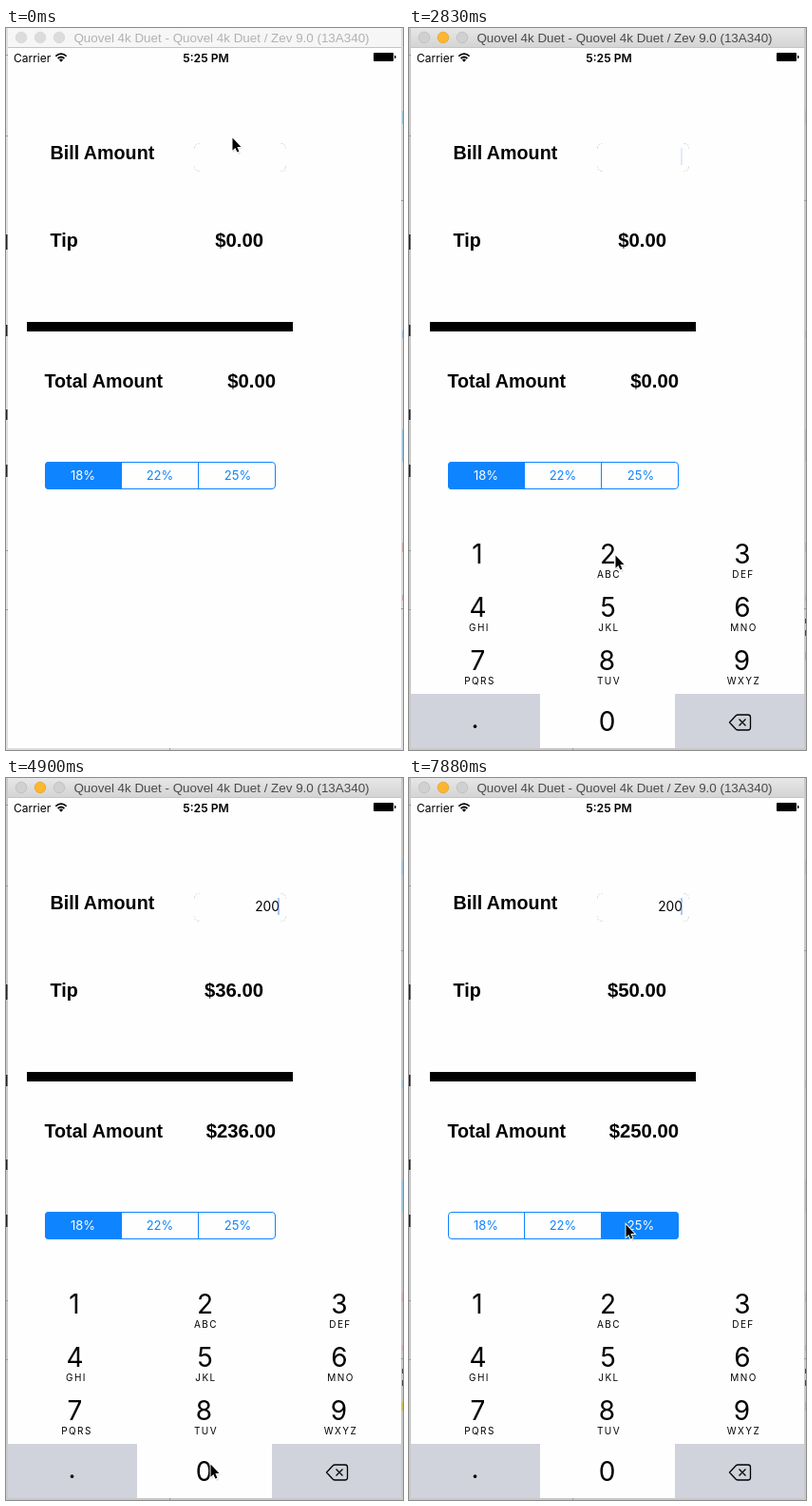
An HTML page for the animation above (8000 ms loop, 418 by 759 pixels).

```html
<!DOCTYPE html>
<html lang="en">
<head>
<meta charset="utf-8">
<title>Tip calculator</title>
<style>
  html, body { margin: 0; height: 100%; overflow: hidden; background: #fff; }
  svg { display: block; width: 418px; height: 759px; }

  text { font-family: Inter, Roboto, sans-serif; }
  .mid { text-anchor: middle; }
  .title { font: 13.4px "Liberation Sans", sans-serif; }
  .label { font: bold 19.7px "Liberation Sans", sans-serif; }
  .sum { font: bold 20.3px "Liberation Sans", sans-serif; text-anchor: end; }
  .entry { font-size: 13.8px; text-anchor: end; }
  .num { font-size: 28px; text-anchor: middle; }
  .abc { font-size: 10px; letter-spacing: 1.4px; text-anchor: middle; }
  .seg { font-size: 13px; text-anchor: middle; fill: #0f84ff; }

  /* Every change is a hard step on one shared 8 s clock. */
  .a { animation: 8s step-end -8ms infinite; }
  .off { opacity: 0; }

  .active { animation-name: active; }
  @keyframes active { 1.875% { opacity: 1 } }
  .late { animation-name: late; }
  @keyframes late { 7.375% { opacity: 1 } }

  .v0 { animation-name: v0; }
  @keyframes v0 { 40.875% { opacity: 0 } }
  .v1 { animation-name: v1; }
  @keyframes v1 { 40.875% { opacity: 1 } 50% { opacity: 0 } }
  .v2 { animation-name: v2; }
  @keyframes v2 { 50% { opacity: 1 } 55.625% { opacity: 0 } }
  .v3 { animation-name: v3; }
  @keyframes v3 { 55.625% { opacity: 1 } 78% { opacity: 0 } }
  .v4 { animation-name: v4; }
  @keyframes v4 { 78% { opacity: 1 } 94.75% { opacity: 0 } }
  .v5 { animation-name: v5; }
  @keyframes v5 { 94.75% { opacity: 1 } }
  .digits { animation-name: digits; }
  @keyframes digits { 55.625% { opacity: 1 } }

  .caret { animation-name: caret; }
  @keyframes caret {
    11.125%, 24.125%, 37.125% { opacity: 1 }
    18.625% { opacity: .3 }
    20.375%, 31.625% { opacity: 0 }
    29.75% { opacity: .3 }
    35.375% { opacity: .15 }
    61.25%, 74.25%, 85.375%, 98.5% { opacity: .4 }
    63.125%, 76.125%, 87.25% { opacity: 0 }
    66.875%, 79.875%, 91% { opacity: 1 }
  }

  .pad { transform: translateY(230px); animation-name: pad; }
  @keyframes pad {
    11.125% { transform: translateY(170px) }
    13% { transform: translateY(62px) }
    14.875% { transform: translateY(8px) }
    16.75% { transform: none }
  }
  .rules { animation-name: rules; }
  @keyframes rules { 16.75% { opacity: 0 } }
  .key2 { animation-name: key2; }
  @keyframes key2 { 37.125% { opacity: 1 } 40.875% { opacity: 0 } }
  .key0 { animation-name: key0; }
  @keyframes key0 {
    48.25%, 53.75% { opacity: 1 }
    50%, 55.625% { opacity: 0 }
  }

  .s1 { animation-name: s1; }
  @keyframes s1 { 78% { opacity: .77 } 79.875% { opacity: 0 } }
  .s2 { animation-name: s2; }
  @keyframes s2 {
    76.125% { opacity: .15 } 78% { opacity: .33 } 79.875% { opacity: 1 }
    94.75% { opacity: .77 } 96.625% { opacity: 0 }
  }
  .s3 { animation-name: s3; }
  @keyframes s3 { 94.75% { opacity: .33 } 96.625% { opacity: 1 } }
  .t1 { fill: #fff; animation-name: t1; }
  @keyframes t1 { 78% { fill: #cfe4fd } 79.875% { fill: #0f84ff } }
  .t2 { animation-name: t2; }
  @keyframes t2 {
    78% { fill: #5eabfa } 79.875% { fill: #fff }
    94.75% { fill: #cfe4fd } 96.625% { fill: #0f84ff }
  }
  .t3 { animation-name: t3; }
  @keyframes t3 { 94.75% { fill: #5eabfa } 96.625% { fill: #fff } }

  .pointer { transform: translate(238px, 115px); animation-name: pointer; }
  @keyframes pointer {
    1.875% { transform: translate(235px, 127px) }
    3.75% { transform: translate(234px, 130px) }
    18.625% { transform: translate(232px, 150px) }
    20.375% { transform: translate(226px, 220px) }
    22.25% { transform: translate(219px, 310px) }
    24.125% { transform: translate(215px, 400px) }
    26% { transform: translate(213px, 470px) }
    27.875% { transform: translate(214px, 520px) }
    29.75% { transform: translate(216px, 546px) }
    31.625% { transform: translate(217px, 554px) }
    42.75% { transform: translate(217px, 590px) }
    44.5% { transform: translate(216px, 665px) }
    46.375% { transform: translate(215px, 715px) }
    48.25% { transform: translate(215px, 721px) }
    63.125% { transform: translate(205px, 695px) }
    65% { transform: translate(180px, 625px) }
    66.875% { transform: translate(152px, 545px) }
    68.625% { transform: translate(128px, 490px) }
    70.5% { transform: translate(121px, 476px) }
    72.375% { transform: translate(132px, 475px) }
    74.25% { transform: translate(143px, 476px) }
    85.375% { transform: translate(152px, 477px) }
    87.25% { transform: translate(176px, 477px) }
    89.125% { transform: translate(204px, 474px) }
    91% { transform: translate(222px, 471px) }
    92.875% { transform: translate(228px, 469px) }
  }
</style>
</head>
<body>
<svg viewBox="0 0 418 759">
  <defs>
    <linearGradient id="bar" x2="0" y2="1">
      <stop stop-color="#e7e7e7"/><stop offset="1" stop-color="#d3d3d3"/>
    </linearGradient>
    <clipPath id="screen"><path d="M2 21H416V757H2z"/></clipPath>
    <clipPath id="pill"><rect x="41" y="456" width="243" height="29" rx="4"/></clipPath>
  </defs>

  <!-- desktop slivers around the window -->
  <path fill="#dedede" d="M0 0H418V759H0z"/>
  <path class="a active off" fill="#c9c9c9" d="M0 0H418V759H0z"/>
  <path fill="#222" d="M0 217h1.5v16H0zM0 312h1.5v12H0zM0 401h1.5v11H0zM0 459h1.5v13H0z"/>
  <path fill="#999" d="M0 28h2v1H0zM0 113h2v1H0zM0 549h2v1H0zM0 611h2v1H0zM172 757h1v2h-1zM416 181h2v1h-2zM416 610h2v1h-2z"/>
  <path fill="#9cc3de" d="M417 87h1v14h-1zM417 318h1v8h-1zM417 422h1v34h-1z"/>
  <path fill="#d3a9a9" d="M417 541h1v10h-1zM417 596h1v6h-1z"/>
  <g class="a late off">
    <path fill="#444" d="M417 621h1v5h-1zM417 633h1v6h-1z"/>
    <path fill="#c9b94a" d="M417 656h1v9h-1z"/>
  </g>

  <!-- title bar -->
  <path fill="#f6f6f6" d="M2 0H416V21H2z"/>
  <g fill="#dcdcdc" stroke="#d0d0d0" stroke-width=".6">
    <circle cx="16" cy="10" r="5.8"/><circle cx="36" cy="10" r="5.8"/><circle cx="56" cy="10" r="5.8"/>
  </g>
  <text class="title mid" x="227" y="15" fill="#b2b2b2">Quovel 4k Duet - Quovel 4k Duet / Zev 9.0 (13A340)</text>
  <g class="a active off">
    <path fill="url(#bar)" d="M2 0H416V21H2z"/>
    <g fill="#d0d0d0" stroke="#b9b9b9" stroke-width=".7">
      <circle cx="16" cy="10" r="5.8"/><circle cx="56" cy="10" r="5.8"/>
      <circle cx="36" cy="10" r="5.8" fill="#fdb62f" stroke="#dfa023"/>
    </g>
    <text class="title mid" x="227" y="15" fill="#4a4a4a">Quovel 4k Duet - Quovel 4k Duet / Zev 9.0 (13A340)</text>
  </g>
  <path fill="#c4c4c4" d="M2 20H416V21H2z"/>

  <!-- app -->
  <g clip-path="url(#screen)">
    <path fill="#fefefe" d="M2 21H416V757H2z"/>
    <text x="8" y="35.5" font-size="12">Carrier</text>
    <g fill="none" stroke="#000" stroke-width="1.7">
      <path d="M52.3 29.6Q58 24.6 63.7 29.6M54.6 32Q58 29 61.4 32"/>
      <path fill="#000" stroke="none" d="M55.9 33.4Q58 31.8 60.1 33.4L58 35.7z"/>
    </g>
    <text class="mid" x="210.5" y="35.5" font-size="12.2" font-weight="600">5:25 PM</text>
    <rect x="387" y="26" width="21" height="9" rx="1"/>
    <path d="M409 28.8q1.6 .2 1.6 1.7t-1.6 1.7z"/>

    <text class="label" x="46.5" y="138">Bill Amount</text>
    <text class="label" x="46.5" y="230">Tip</text>
    <text class="label" x="40.5" y="378">Total Amount</text>
    <path d="M22 309H302V319H22z"/>

    <path fill="none" stroke="#d4d4d4" stroke-dasharray="2 1.5" d="M198.5 126.5q0-5 5-5M289.5 121.5q5 0 5 5M294.5 145.5q0 5-5 5M203.5 150.5q-5 0-5-5"/>

    <g class="a v0">
      <text class="sum" x="271" y="230">$0.00</text>
      <text class="sum" x="284" y="378">$0.00</text>
    </g>
    <g class="a v1 off">
      <text class="entry" x="288" y="140">2</text>
      <text class="sum" x="271" y="230">$0.36</text>
      <text class="sum" x="284" y="378">$2.36</text>
    </g>
    <g class="a v2 off">
      <text class="entry" x="288" y="140">20</text>
      <text class="sum" x="271" y="230">$3.60</text>
      <text class="sum" x="284" y="378">$23.60</text>
    </g>
    <text class="entry a digits off" x="288" y="140">200</text>
    <g class="a v3 off">
      <text class="sum" x="271" y="230">$36.00</text>
      <text class="sum" x="284" y="378">$236.00</text>
    </g>
    <g class="a v4 off">
      <text class="sum" x="271" y="230">$44.00</text>
      <text class="sum" x="284" y="378">$244.00</text>
    </g>
    <g class="a v5 off">
      <text class="sum" x="271" y="230">$50.00</text>
      <text class="sum" x="284" y="378">$250.00</text>
    </g>
    <path class="a caret off" fill="#3a74e4" d="M286 126h2v18h-2z"/>

    <!-- tip picker -->
    <g clip-path="url(#pill)" fill="#0f84ff">
      <path class="a s1" d="M41 456h81v29H41z"/>
      <path class="a s2 off" d="M122 456h81v29h-81z"/>
      <path class="a s3 off" d="M203 456h81v29h-81z"/>
    </g>
    <g fill="none" stroke="#0f84ff">
      <rect x="41.5" y="456.5" width="242" height="28" rx="3.5"/>
      <path d="M121.5 456.5v28M202.5 456.5v28"/>
    </g>
    <text class="seg a t1" x="81" y="475">18%</text>
    <text class="seg a t2" x="162" y="475">22%</text>
    <text class="seg a t3" x="244" y="475">25%</text>

    <!-- number pad -->
    <g class="a pad">
      <path fill="#fefefe" d="M2 532H416V757H2z"/>
      <g fill="#d0d3db">
        <path d="M2 700H138V757H2zM280 700H416V757H280z"/>
        <path class="a key2 off" d="M138 532h142v56H138z"/>
        <path class="a key0 off" d="M138 700h142v57H138z"/>
      </g>
      <path class="a rules" fill="#8e8e8e" d="M2 588H416v1H2zM2 644H416v1H2z"/>
      <g class="num">
        <text x="72" y="562.5">1</text><text x="209.5" y="562.5">2</text><text x="351" y="562.5">3</text>
        <text x="72.5" y="619">4</text><text x="209.5" y="619">5</text><text x="351" y="619">6</text>
        <text x="72.5" y="675">7</text><text x="208.5" y="675">8</text><text x="350.5" y="675">9</text>
        <text x="69.5" y="736">.</text><text x="208.5" y="738.5">0</text>
      </g>
      <g class="abc">
        <text x="210.5" y="578">ABC</text><text x="352" y="578">DEF</text>
        <text x="74" y="634">GHI</text><text x="210.5" y="634">JKL</text><text x="352.5" y="634">MNO</text>
        <text x="74.5" y="690">PQRS</text><text x="210.5" y="690">TUV</text><text x="352.5" y="690">WXYZ</text>
      </g>
      <path fill="none" stroke="#000" stroke-width="1.3" stroke-linejoin="round" d="M337.5 730l6.5-7q1-1 2.5-1H357q2.5 0 2.5 2.5v11q0 2.5-2.5 2.5H346.5q-1.5 0-2.5-1zM347.5 726.5l7 7M354.5 726.5l-7 7"/>
    </g>
  </g>

  <g class="a pointer">
    <path fill="#000" fill-opacity=".12" d="M1 2V16L4.500 13 7 18 9 17 7 12H11z"/>
    <path stroke="#fff" stroke-width="1.8" paint-order="stroke" d="M.5 .5V13.700L3.400 10.900 5.400 15.600 7.400 14.700 5.400 10.100H9.500z"/>
  </g>
</svg>
</body>
</html>
```
